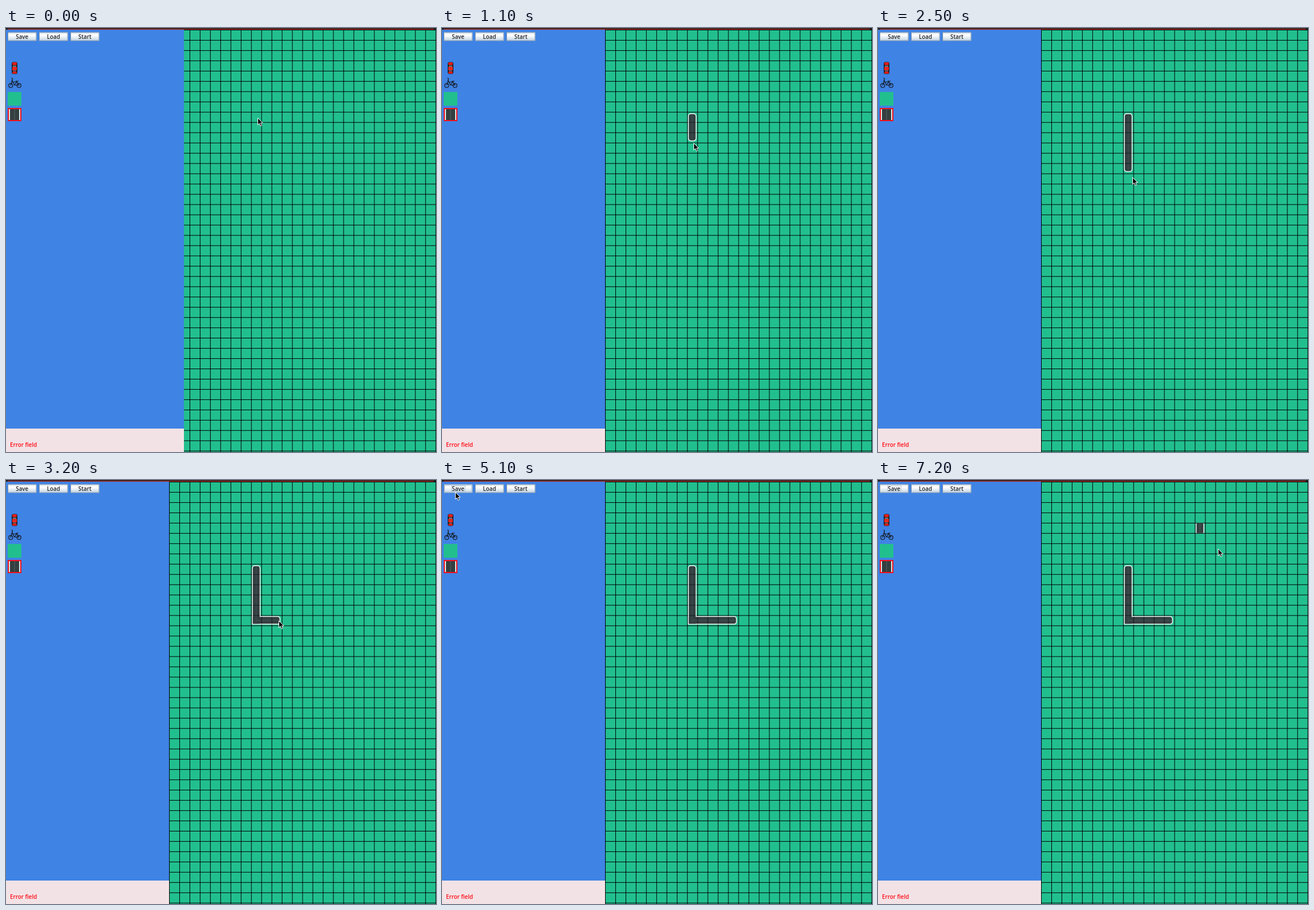
An HTML page with a canvas for the animation above (8000 ms loop, 754 px wide and 742 px high).

```html
<!DOCTYPE html>
<html lang="en">
<head>
<meta charset="utf-8">
<title>Road editor</title>
<style>
html, body { margin: 0; width: 100%; height: 100%; overflow: hidden; }
canvas { display: block; }
</style>
</head>
<body>
<canvas id="stage" width="754" height="742"></canvas>
<script>
const ctx = document.getElementById('stage').getContext('2d');
const LOOP = 8000, STEP = 100, CELL = 17.97, GRID_X = 286, GRID_Y = 3;
const GREEN = '#22bf8e', ASPHALT = '#333f40', EDGE = '#f0f4f2';

// time, x, y of the pointer tip
const POINTER = [
  [200, 441, 157], [300, 440, 162], [400, 439, 168], [1100, 441, 201],
  [1200, 441, 209], [1400, 441, 209], [1500, 441, 212], [1800, 438, 226],
  [2000, 438, 249], [2100, 438, 249], [2500, 446, 261], [3000, 474, 247],
  [3200, 478, 246], [3800, 514, 244], [3900, 514, 244], [4000, 503, 239],
  [4100, 458, 215], [4300, 250, 122], [4500, 75, 46], [4700, 23, 21],
  [5800, 23, 21], [5900, 75, 27], [6100, 485, 75], [6200, 563, 86],
  [6600, 563, 86], [7200, 596, 120]
];
const ROW_TIMES = [300, 500, 800, 1500, 1900, 2200];
const COLUMN_TIMES = [2700, 3100, 3400, 3700];
const reached = (times, t) => times.filter(v => v <= t).length;
const columnX = i => GRID_X + CELL * i;
const rowY = i => GRID_Y + CELL * i;

function rect(x, y, w, h, color) {
  ctx.fillStyle = color;
  ctx.fillRect(x, y, w, h);
}

function frame(x, y, w, h, color, width = 1) {
  ctx.strokeStyle = color;
  ctx.lineWidth = width;
  ctx.strokeRect(x + width / 2, y + width / 2, w - width, h - width);
}

function rounded(x, y, w, h, radii, color) {
  ctx.fillStyle = color;
  ctx.beginPath();
  ctx.roundRect(x, y, w, h, radii);
  ctx.fill();
}

function text(label, x, y, color, align) {
  ctx.font = '600 9.8px "Open Sans", "Noto Sans", sans-serif';
  ctx.textAlign = align;
  ctx.fillStyle = color;
  ctx.fillText(label, x, y);
}

function pointerAt(t) {
  const next = POINTER.findIndex(p => p[0] > t);
  if (next === 0) return POINTER[0].slice(1);
  if (next < 0) return POINTER[POINTER.length - 1].slice(1);
  const [t0, x0, y0] = POINTER[next - 1], [t1, x1, y1] = POINTER[next];
  const k = (t - t0) / (t1 - t0);
  return [Math.round(x0 + (x1 - x0) * k), Math.round(y0 + (y1 - y0) * k)];
}

function drawGrid() {
  rect(GRID_X, GRID_Y, 754 - GRID_X, 742 - GRID_Y, GREEN);
  for (let i = 0; i <= 26; i++) rect(columnX(i), GRID_Y, 1, 739, '#000');
  for (let i = 0; i <= 41; i++) rect(GRID_X, rowY(i), 468, 1, '#000');
}

function drawTile(column, row) {
  const x = columnX(column) + 1.5, y = rowY(row) + 1;
  rect(x, y, 15, CELL - 1, EDGE);
  rect(x + 1.5, y, 12, CELL - 1, ASPHALT);
  rect(x + 7, y, 1, CELL - 1, '#4d5959');
}

// A road down from cell (8, 8), turning right in its sixth row.
function drawRoad(rows, columns) {
  if (!rows) return;
  if (rows === 1) return drawTile(8, 8);
  const width = 15, cap = 2.5;
  const left = columnX(8) + 1.5, top = rowY(8) + cap;
  const bendTop = rowY(13) + 1.5;
  const bottom = columns ? bendTop + width : rowY(8 + rows) - cap;
  const right = columnX(9 + columns) - cap;
  for (const [inset, radius, color] of [[0, 5, EDGE], [1.5, 3.8, ASPHALT]]) {
    const end = columns ? 0 : radius;
    const thickness = width - 2 * inset;
    rounded(left + inset, top + inset, thickness, bottom - top - 2 * inset,
      [radius, radius, end, end], color);
    if (columns) rounded(left + inset, bendTop + inset, right - left - 2 * inset, thickness,
      [0, radius, radius, 0], color);
  }
  const seam = 'rgba(0,0,0,.6)', lane = 'rgba(130,145,145,.22)';
  rect(left + 7, top + 3, 1, bottom - top - 7, lane);
  if (columns) rect(left + 7, bendTop + 7, right - left - 11, 1, lane);
  for (let i = 1; i < rows; i++) rect(left + 1.5, rowY(8 + i), 12, 1, seam);
  for (let i = 1; i <= columns; i++) rect(columnX(8 + i), bendTop + 1.5, 1, 12, seam);
}

function drawButton(label, x, { hover, pressed, focus } = {}) {
  const y = 7.5, w = 50.5, h = 15;
  const shade = ctx.createLinearGradient(0, y, 0, y + h);
  shade.addColorStop(0, '#e3ebf3');
  shade.addColorStop(.35, '#ffffff');
  shade.addColorStop(1, '#c0d2e4');
  rect(x, y, w, h, pressed ? '#b8cfe5' : shade);
  frame(x, y, w, h, '#8296ac');
  if (hover && !pressed) frame(x + 1, y + 1, w - 2, h - 2, '#a9c4df');
  if (focus) frame(x + 13, 10, 25, 10, '#b9c9da');
  text(label, x + w / 2, 18.5, '#20242a', 'center');
}

function drawCar() {
  rounded(10, 59.5, 10, 21, 3, '#191c22');
  rounded(11, 60, 8, 5, 2, '#e31d19');
  rect(11, 68, 8, 6, '#e8271f');
  rect(12, 66, 6, 1.5, '#7fa0a8');
  rect(12.5, 74.5, 5, 1, '#7fa0a8');
  rounded(11, 76, 8, 4, 2, '#dc1c19');
}

function drawBike() {
  ctx.strokeStyle = '#15191f';
  ctx.lineWidth = 1.2;
  for (const x of [8.3, 22.8]) {
    ctx.beginPath();
    ctx.arc(x, 100.7, 3.5, 0, 7);
    ctx.stroke();
  }
  ctx.stroke(new Path2D('M8.3 100.7L11.5 88.5L9.5 87.5M11 92L15 100H22.8L19 94L15 100M11 95L19 94M17 93H22'));
}

function drawPanel(t) {
  const width = t < 300 ? 312 : 286;
  rect(0, 3, width, 698, '#3f83e4');
  rect(0, 701, width, 41, '#f2e2e6');
  text('Error field', 7, 732.5, '#ff0b14', 'left');
  drawButton('Save', 3, {
    hover: t >= 4700 && t < 5900,
    pressed: t === 5000,
    focus: t >= 5000
  });
  drawButton('Load', 58);
  drawButton('Start', 113);
  drawCar();
  drawBike();
  rect(3, 112, 24, 24, GREEN);
  rect(3, 140, 24, 23, ASPHALT);
  rect(5, 142, 2, 19, '#dfe5e2');
  rect(23, 142, 2, 19, '#dfe5e2');
  rect(14.5, 142, 1, 19, '#566261');
  frame(3, 140, 24, 23, '#f5101b', 2);
}

function drawPointer([x, y]) {
  ctx.save();
  ctx.translate(x + .5, y + .5);
  const arrow = new Path2D('M0 0V12L2.8 9.5L4.8 14L6.9 13L5 8.7H8.7Z');
  ctx.lineWidth = 1;
  ctx.strokeStyle = '#fff';
  ctx.fillStyle = '#000';
  ctx.fill(arrow);
  ctx.stroke(arrow);
  ctx.restore();
}

function draw(t) {
  rect(0, 0, 754, 3, '#1f2022');
  drawGrid();
  drawRoad(reached(ROW_TIMES, t), reached(COLUMN_TIMES, t));
  if (t >= 6500) drawTile(15, 4);
  drawPanel(t);
  rect(3, 1.6, 747, 1.1, '#d8372d');
  drawPointer(pointerAt(t));
}

const start = performance.now();
function tick() {
  const t = (performance.now() - start) % LOOP;
  draw(Math.floor(t / STEP) * STEP);
  requestAnimationFrame(tick);
}
tick();
</script>
</body>
</html>
```
